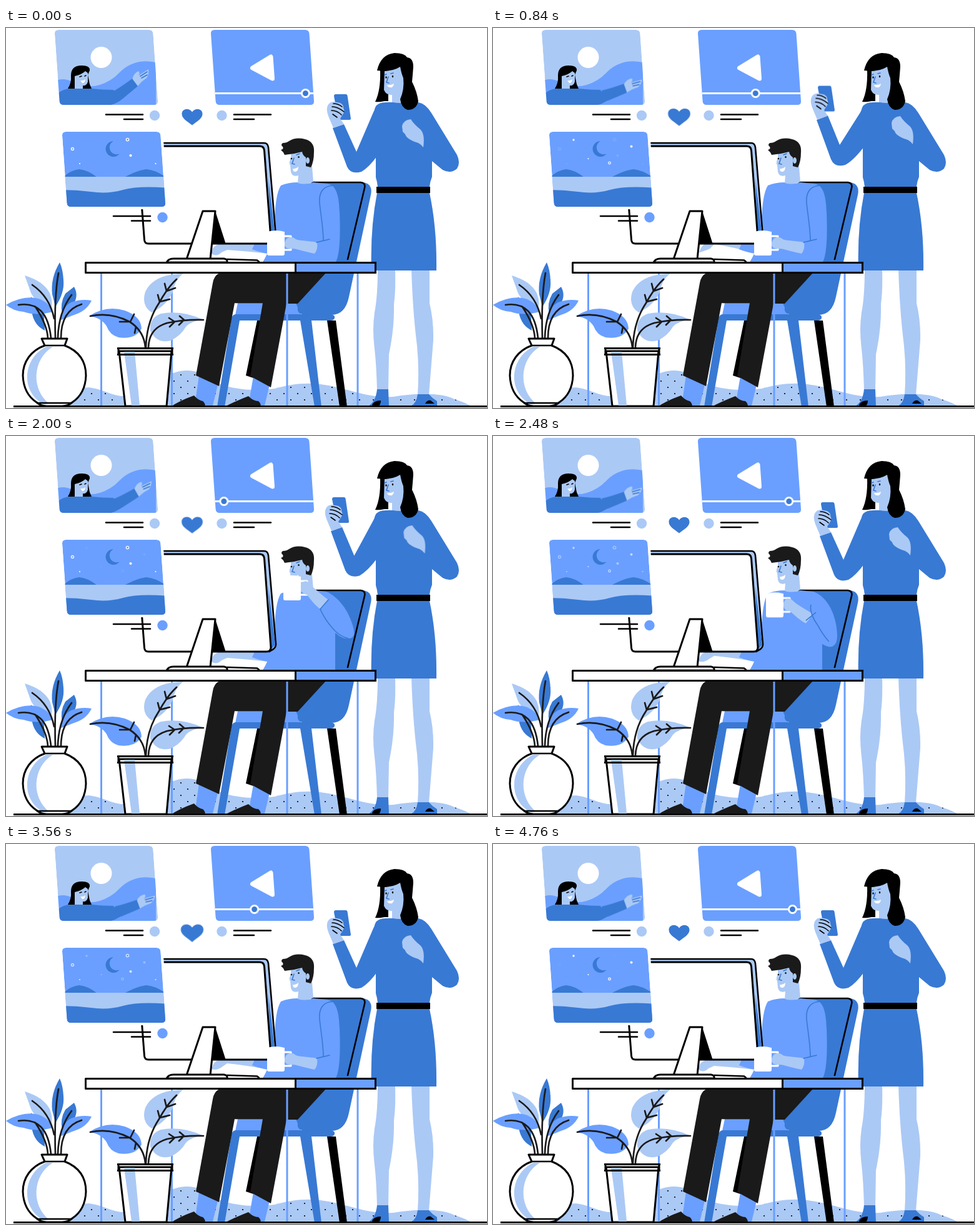
These frames come from a looping animation (770x608 px, 4.8 s). An HTML page:

```html
<!DOCTYPE html>
<html lang="en">
<head>
<meta charset="utf-8">
<title>Sharing videos at work</title>
<style>
html, body { margin: 0; width: 100%; height: 100%; overflow: hidden; background: #fff; }
svg { display: block; width: 770px; height: 608px; }
.l { fill: #abc9f5; }
.m { fill: #6a9fff; }
.d { fill: #3879d4; }
.k { fill: #000; }
.s { fill: #1a1a1a; }
.w { fill: #fff; }
.ln { fill: none; stroke: #000; stroke-width: 2.6; stroke-linecap: round; stroke-linejoin: round; }
.thin { stroke-width: 1.6; }
.vein { stroke: #1a1a1a; stroke-width: 2.7; }
.box { fill: #fff; stroke: #000; stroke-width: 3; stroke-linejoin: round; }
.blue { fill: none; stroke: #3879d4; stroke-width: 1.6; stroke-linecap: round; }
.anim, .anim * { animation-duration: 4.8s; animation-iteration-count: infinite; animation-timing-function: linear; }

/* night card */
.starA { animation-name: starA; }
.starB { animation-name: starB; }
@keyframes starA { 0%, 40%, 80% { opacity: 1; } 20%, 60%, 100% { opacity: 0; } }
@keyframes starB { 0%, 40%, 80% { opacity: 0; } 20%, 60%, 100% { opacity: 1; } }

/* waving hand */
.wave { transform-origin: 178px 110px; animation-name: wave; }
@keyframes wave {
  0%, 40%, 80% { transform: rotate(0deg); }
  4.17%, 35.83%, 44.17%, 75.83%, 84.17%, 100% { transform: rotate(17deg); }
}

/* player and heart */
.anim .knob { animation: knob 2.4s linear infinite; }
@keyframes knob {
  0%, 98.3%, 100% { transform: translateX(0); }
  80% { transform: translateX(-135.3px); animation-timing-function: cubic-bezier(.65, 0, .35, 1); }
}
.anim .heart { transform-origin: 298px 143px; animation: beat 2.4s ease-in-out infinite; }
@keyframes beat { 50% { transform: scale(1.1); } }

/* woman */
.phone { animation-name: phone; }
.sleeve { animation-name: sleeve; }
.chest { animation-name: chest; }
.lid { transform-origin: 613px 78px; animation-name: blink; }
@keyframes phone {
  0%, 44.17%, 80%, 99.17%, 100% { transform: translate(0, 0); }
  4.17%, 40%, 84.17%, 95% { transform: translate(-5px, -13.5px); }
}
@keyframes chest {
  0%, 44.17%, 80%, 99.17%, 100% { transform: translate(0, 0); }
  4.17%, 40%, 84.17%, 95% { transform: translate(4px, -5px); }
}
@keyframes sleeve {
  0%, 44.17%, 80%, 99.17%, 100% { d: path("M523 160L541 154L561 198L588 135Q592 124 604 119L610 190L594 205Q581 223 569 230Q552 235 546 222Z"); }
  4.17%, 40%, 84.17%, 95% { d: path("M518 147L536 140L555 187L588 135Q592 124 604 119L610 180L594 190Q577 212 564 219Q547 224 541 210Z"); }
}
@keyframes blink { 0%, 22.5%, 25%, 100% { transform: none; } 23.3%, 24.2% { transform: scaleY(.15); } }

/* man */
.cup { animation-name: cup; }
.fore { animation-name: fore; }
.upper { animation-name: upper; }
.fold { animation-name: fold; }
.cuff { animation-name: cuff; }
.anim .type { animation: type 2.4s linear infinite; }
@keyframes cup {
  0%, 17.9%, 56.25%, 100% { transform: translate(0, 0); }
  24.2%, 50% { transform: translate(26px, -101px); }
}
@keyframes fore {
  0%, 17.9%, 56.25%, 100% { d: path("M446 346C446 336 456 331 464 338C472 341 484 340 498 343C499 350 498 356 494 361C482 359 468 354 460 353C452 354 446 352 446 346Z"); }
  24.2%, 50% { d: path("M472 243C471 234 480 228 486 236C493 244 505 254 516 262C512 268 508 273 503 277C495 271 487 261 482 254C476 253 472 249 472 243Z"); }
}
@keyframes upper {
  0%, 17.9%, 56.25%, 100% { d: path("M513 249C529 250 533 268 534 295C536 340 533 366 528 374C515 374 505 367 494 361L498 342C509 330 502 290 502 275C502 258 508 249 513 249Z"); }
  24.2%, 50% { d: path("M513 249C533 258 548 280 554 300C560 318 558 326 543 324C530 321 515 306 503 277L516 262C520 266 520 262 518 258C516 252 514 249 513 249Z"); }
}
@keyframes fold {
  0%, 17.9%, 56.25%, 100% { d: path("M525 252C504 252 501 268 502 280C504 300 508 320 508 340"); }
  24.2%, 50% { d: path("M503 277C508 288 515 300 527 312C533 318 540 322 548 324"); }
}
@keyframes cuff {
  0%, 17.9%, 56.25%, 100% { d: path("M497 343L518 338"); }
  24.2%, 50% { d: path("M503 277L516 262"); }
}
@keyframes type {
  0%, 22.2%, 44.4%, 66.7%, 100% { d: path("M329 358Q331 349 340 346L420 345V361Q385 357 354 355L345 359Q337 367 329 361Z"); }
  11.1%, 33.3%, 55.6% { d: path("M331 357Q334 348 341 344L420 345V361Q385 349 354 344L348 352Q339 355 331 359Z"); }
}
</style>
</head>
<body>
<svg class="anim" viewBox="0 0 770 608">
<defs>
  <pattern id="dots" width="22" height="20" patternUnits="userSpaceOnUse">
    <circle cx="5" cy="5" r="1.1"/><circle cx="16" cy="15" r="1.1"/>
  </pattern>
  <path id="hill" d="M97 606Q108 576 132 575C155 577 172 591 195 589C225 586 240 550 268 552C290 544 312 549 326 561C350 578 395 582 430 577C455 570 482 566 510 571C550 577 580 593 620 590C660 583 700 584 718 594Q735 599 746 606Z"/>
  <path id="card" d="M84 3H229Q235 3 235.500 9L243 117Q243.500 123 237 123H92Q86 123 85.600 117L78 9Q77.600 3 84 3Z"/>
  <clipPath id="frame"><use href="#card"/></clipPath>
</defs>

<use href="#hill" class="l"/><use href="#hill" fill="url(#dots)"/>

<!-- chair -->
<path class="k" d="M514 468H528L546 606H534ZM402 468H411L396 560L384 556Z"/>
<path class="m" d="M371 440H472V459H367Z"/>
<path class="ln" d="M367 439H412"/>
<path class="d" d="M368 458H520Q527 459 526 464Q525 468 519 468H489L505 606H494L471 468H374L350 606H338L361 464Q363 458 368 458Z"/>
<path class="d" d="M492 247H570Q588 248 584 267L549 430Q543 459 521 459H480Q465 458 467 447L462 436L500 390Z"/>
<path class="ln" stroke-width="3" d="M490 247H568Q576 248 574 256L547 370"/>

<!-- woman -->
<path class="l" d="M595 386H623Q624 420 621 442Q622 480 613 522L612 580H594Q593 540 590 513Q586 482 590 455Q595 430 595 386ZM649 386H678V440Q685 470 684 500L677 587H659Q662 540 657 500Q651 450 649 386Z"/>
<path class="d" d="M594 578H612L613 605H580Q592 598 594 578ZM659 586H677Q682 592 690 597V605H648Q657 601 659 586Z"/>
<path class="k" d="M586 604Q588 596 600 596Q600 603 596 605ZM671 601Q674 595 680 596L686 601Z"/>
<path class="k" d="M600 60H612V117H606Q596 119 591 118Q600 100 599 67Z"/>
<path class="l" d="M606 69Q621 68 628 57L637 66V122H618V107Q609 108 605 99Z"/>
<g class="lid"><ellipse cx="608.500" cy="79" rx="1.200" ry="1.800"/><ellipse cx="619" cy="77.500" rx="1.200" ry="1.800"/></g>
<path class="blue" d="M606 75L609 74M616 73L620 72M612 78L609 87L613 88"/>
<path class="w" d="M610 91Q616 92 621 89Q620 96 615 95Q611 95 610 91Z"/>
<path class="d" d="M600 120Q611 118 620 119Q630 121 640 119L660 119Q672 121 681 136L722 203Q728 216 722 225Q712 234 699 227L682 213V238Q679 245 678 254H595Q594 245 592 239V190L590 130Q592 122 600 120Z"/>
<path class="k" d="M594 68Q600 42 622 40Q638 40 642 47Q652 48 652 62Q651 76 650 86Q658 102 660 117Q657 131 643 131Q633 128 631 114Q638 98 636 80Q633 73 631 62Q617 71 594 68Z"/>
<path class="k" d="M593 254H679V264H593Z"/>
<path class="d" d="M594 264H678Q690 320 689 388H585Q583 320 594 264Z"/>
<path class="l chest" d="M634 157Q636 147 648 146Q653 154 663 162Q671 169 668 191Q664 186 660 184Q641 178 639 170L635 166Z"/>
<path class="d sleeve" d="M523 160L541 154L561 198L588 135Q592 124 604 119L610 190L594 205Q581 223 569 230Q552 235 546 222Z"/>
<g class="phone">
  <path class="d" d="M528 106H544Q546 106 546.500 108L552 145Q552 147 550 147H532L525 109Q525 106 528 106Z"/>
  <path class="l" d="M524 160L516 141Q512 131 515 124Q518 118 525 118L535 120Q541 123 540 128Q543 133 540 137L535 145L541 154Z"/>
  <path class="ln thin" d="M524 121Q532 121 538 126M522 126Q531 126 541 134M521 132Q530 132 537 139M523 138L530 143"/>
</g>

<!-- trousers and shoes -->
<path class="m" d="M309 556L339 571L331 604H302ZM396 557L422 571L414 604H388Z"/>
<path class="s" d="M342 392H512L467 441H449L424 575L391 557L411 440H366L341 573L304 556L331 408Q333 396 342 392Z"/>
<path class="s" d="M264 606Q276 597 301 588Q308 596 315 597Q319 600 319 606ZM350 606Q365 598 388 589Q396 597 404 597Q408 600 408 606Z"/>

<!-- man -->
<path class="m" d="M440 252Q452 247 467 247Q480 251 492 247L513 249Q529 258 527 300V376H410Q427 350 430 310Q431 266 440 252Z"/>
<path class="l" d="M456 196H490L490 222L492 246Q480 252 467 248L468 236Q458 239 456 230L455 219Q452 217 456 208Z"/>
<path class="s" d="M446 203Q444 198 440 195Q445 194 443 190Q439 187 443 184Q449 184 453 181Q464 174 479 178Q494 182 493 198Q493 214 488 223L480 221V207Q475 204 474 198Q460 202 446 203Z"/>
<ellipse class="l" cx="483" cy="212" rx="3" ry="5"/>
<circle cx="457" cy="209" r="1.300"/><circle cx="468.500" cy="206.500" r="1.300"/>
<path class="blue" d="M465 203L470 201M461 208L458 217L462 218"/>
<path class="w" d="M459 225Q464 226 468 222Q468 229 463 230Q459 230 459 225Z"/>
<path class="l type" d="M329 358Q331 349 340 346L420 345V361Q385 357 354 355L345 359Q337 367 329 361Z"/>
<path class="m" d="M398 345H432V362Q410 361 394 354Z"/>

<!-- monitor -->
<path class="ln" style="fill:#abc9f5" d="M240 184H413Q419 184 420 191L432 333Q432 338 428 341L421 345L400 340V190H240Z"/>
<path class="d" d="M420 240L431 334L424 342Z"/>
<path class="box" d="M210 189H406Q413 189 413.500 196L424 338Q424 345 417 345H228Q222 345 221.500 339Z"/>
<path class="k" d="M335 293L352 346H327Z"/>
<path class="box" d="M315 293H335L327 370H289Z"/>
<path class="box" d="M257 375Q260 369 268 369H349Q355 370 354 375Z"/>
<path class="ln" d="M354 370L402 371.500L405 374"/>

<!-- desk -->
<path d="M152.500 392V605M265.500 392V605M450 392V605M563 392V605" stroke="#6a9fff" stroke-width="3"/>
<path class="box" d="M127.500 375.500H591.500V391.500H127.500Z"/>
<path class="m" stroke="#000" stroke-width="3" d="M463.500 375.500H591.500V391.500H463.500Z"/>

<!-- drinking arm -->
<path class="m upper" d="M513 249C529 250 533 268 534 295C536 340 533 366 528 374C515 374 505 367 494 361L498 342C509 330 502 290 502 275C502 258 508 249 513 249Z"/>
<g class="cup">
  <path class="w" d="M418 326Q432 322 446 326V361Q446 364 443 364H421Q418 364 418 361Z"/>
  <path d="M445 333H456V355H445" fill="none" stroke="#fff" stroke-width="3" stroke-linejoin="round"/>
</g>
<path class="l fore" d="M446 346C446 336 456 331 464 338C472 341 484 340 498 343C499 350 498 356 494 361C482 359 468 354 460 353C452 354 446 352 446 346Z"/>
<path class="blue fold" d="M525 252C504 252 501 268 502 280C504 300 508 320 508 340"/>
<path class="blue cuff" d="M497 343L518 338"/>

<!-- vase -->
<path class="d" d="M86 375Q71 400 74 426L79 446Q94 424 92 403Q91 386 86 375ZM40 430Q59 447 61 464L62 484Q46 476 42 458ZM109 414Q118 430 105 446L90 458Q86 440 95 425Z"/>
<path class="l" d="M30 396Q60 405 70 424Q76 440 72 448Q48 440 40 424Z"/>
<path class="m" d="M0 443Q28 427 52 433Q70 440 75 454Q48 461 28 454Q12 453 0 443ZM137 436Q129 453 109 459L86 468Q88 448 104 439Q120 433 137 436Z"/>
<path class="ln vein" d="M84 392Q77 430 79 496M42 411Q70 430 77 465M20 443Q66 436 72 496M47 446Q66 475 67 496M105 427Q84 455 83 496M121 442Q88 452 88 496"/>
<path class="box" stroke-width="3" d="M57 497H98L94 508C117 517 128 534 128 556Q127 585 106 599Q99 605 90 605H65Q56 605 49 599Q28 585 27 556C27 534 40 516 62 508Z"/>
<path class="l" d="M64 510C25 530 24 584 61 602L69 601C40 578 42 530 75 510Z"/>
<path class="ln" d="M62 508H94M51 600H104"/>

<!-- potted plant -->
<path class="l" d="M283 393Q236 394 223 422Q216 444 233 455Q256 446 267 422Q270 404 283 393ZM316 467Q282 451 248 457Q229 464 231 484Q241 506 264 500Q280 492 288 478Q297 468 316 467Z"/>
<path class="m" d="M133 461Q160 443 190 452Q216 461 217 481Q207 499 180 495Q166 491 161 477Q152 463 133 461Z"/>
<path class="ln vein" d="M224 511Q225 470 245 440Q258 416 273 402M228 511Q229 480 258 472Q285 466 316 467M223 511Q221 485 198 470Q167 454 135 461M243 427L246 438L262 434M254 409L257 421L271 416M261 464L270 470L262 478M278 461L285 467L277 475M205 458L199 470L182 470M206 488L208 478"/>
<path class="box" d="M181 517L191 605H257L265 517Z"/>
<path class="l" d="M189 518H206L214 604H201Z"/>
<path class="box" d="M178 512.500H268M178 522.500H268M180 513V522M266 513V522"/>
<path d="M12 605.500H770" stroke="#000" stroke-width="3"/>

<!-- card with the waving woman -->
<g clip-path="url(#frame)">
  <use href="#card" class="l"/>
  <circle class="w" cx="152.500" cy="47" r="17"/>
  <path class="m" d="M80 84Q94 79 108 87Q130 97 150 91Q169 85 182 71Q205 48 240 55V125H80Z"/>
  <path class="k" d="M99 97Q105 88 104 76Q104 60 121 60Q135 60 134 68L131 75L134 90L137 97Z"/>
  <path class="l" d="M110 77Q122 74 127 69L131 72V86Q129 93 123 92V97H110Z"/>
  <path class="ln thin" d="M118 78L121 77M126 77L128 76"/>
  <path class="w" d="M119 84Q124 85 127 82Q126 89 122 88Z"/>
  <g class="wave">
    <path class="l" d="M202 83Q204 72 212 69Q215 72 212 76L228 66Q229 74 225 80Q218 84 210 94Z"/>
    <path class="blue" d="M215 77L226 70M217 80L226 75" stroke-width="1"/>
    <path class="d" d="M172 101Q180 97 202 81L211 93L187 113Q178 121 166 122Z"/>
  </g>
  <path class="d" d="M82 106Q90 97 105 97H137Q155 99 172 99L182 116Q172 125 150 125H82Z"/>
</g>

<!-- player card -->
<g transform="translate(250 0)">
  <use href="#card" class="m"/>
  <path class="w" stroke="#fff" stroke-width="7" stroke-linejoin="round" d="M144.500 64L174 46L176.500 81Z"/>
  <path d="M85 104.500H242" stroke="#fff" stroke-width="2.800"/>
  <circle class="d knob" cx="229.500" cy="104.500" r="6" stroke="#fff" stroke-width="3"/>
</g>

<!-- night card -->
<g transform="translate(12 163)">
  <use href="#card" class="w" stroke="#fff" stroke-width="8"/>
  <g clip-path="url(#frame)">
    <use href="#card" class="m"/>
    <g transform="translate(-12 -163)">
      <path class="d" d="M172 181A12.500 12.500 0 1 0 182 201A10.800 10.800 0 0 1 172 181ZM92 238Q105 227 117 226Q131 227 146 239ZM189 239Q212 227 225 226Q239 227 256 239Z"/>
      <path class="l" d="M90 238H260V290H90Z"/>
      <path class="d" d="M90 259Q113 259 136 262Q163 266 187 259Q213 252 260 256V290H90Z"/>
      <g class="starA w">
        <circle cx="118" cy="217" r="1.100"/><circle cx="239.500" cy="217" r="1.100"/><circle cx="199.500" cy="204" r="2.100"/>
        <g fill="none" stroke="#fff" stroke-width="1.300"><circle cx="106.500" cy="193.500" r="2"/><circle cx="194.500" cy="178.500" r="2.200"/></g>
      </g>
      <g class="starB w">
        <circle cx="129" cy="179" r="1.700"/><circle cx="221.500" cy="189.500" r="2"/><circle cx="152.500" cy="209" r="1.100"/>
        <circle cx="186.500" cy="216" r="1.800" fill="none" stroke="#fff" stroke-width="1.300"/>
      </g>
    </g>
  </g>
</g>

<!-- captions -->
<path class="ln" d="M160 138.500H219M189 146H219M365 138.500H424M365 146H397M172 301H231M201 308.500H231"/>
<circle class="l" cx="238" cy="140" r="8.200"/>
<circle class="l" cx="345.500" cy="140" r="8.200"/>
<circle class="m" cx="250.500" cy="303" r="8.200"/>
<path class="d heart" d="M298 155.500C290 149 281.500 145 281.500 137.500C281.500 129 293 127 298 134.500C303 127 314.500 129 314.500 137.500C314.500 145 306 149 298 155.500Z"/>
</svg>
</body>
</html>
```
